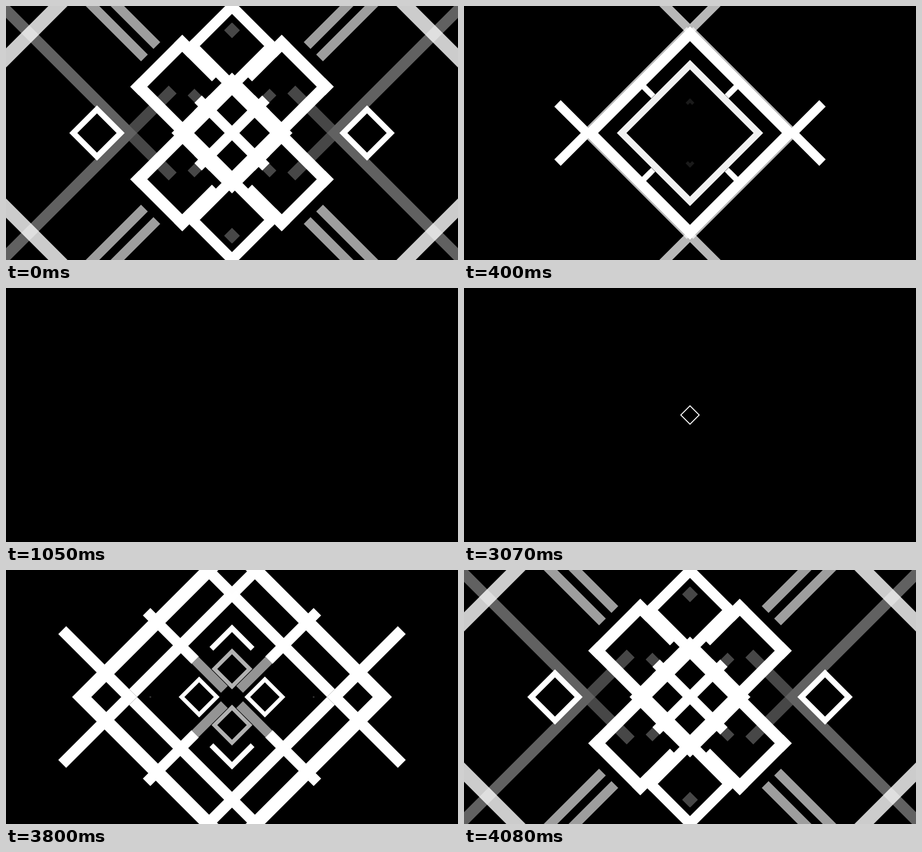
Animation, 800 px wide and 450 px high, one loop 4120 ms. Source, as an HTML page with a canvas:

```html
<!DOCTYPE html>
<html lang="en">
<head>
<meta charset="utf-8">
<title>Diamond lattice</title>
<style>
  html, body { margin: 0; width: 100%; height: 100%; overflow: hidden; background: #000; }
  canvas { display: block; width: 800px; height: 450px; }
</style>
</head>
<body>
<canvas id="stage" width="800" height="450"></canvas>
<script>
const ctx = document.getElementById('stage').getContext('2d');
const LOOP = 4120, EMPTY = 25;
const { min, max, abs, exp, floor, ceil } = Math;
const MIRRORS = [[1, 1], [-1, 1], [1, -1], [-1, -1]];

// Steps away from the fully opened pattern: 0 is open, EMPTY is black.
// Steps last 40 ms near the open pose and a little longer near the empty one.
function stepAt(t) {
  if (t < 680) return floor(t / 40);
  if (t < 1050) return 17 + floor((t - 680) / 46.25);
  if (t < 3070) return EMPTY;
  if (t < 3560) return 13 + ceil((3560 - t) / 44.6);
  return max(0, ceil((4080 - t) / 40));
}

const white = shade => `rgba(255,255,255,${min(1, shade)})`;

// A slanted rectangle in u = x + y, v = y - x, repeated in all four quadrants.
function bar(u0, u1, v0, v1, shade = 1) {
  if (u1 <= u0 || v1 <= v0 || shade <= 0) return;
  const corners = [[u0, v0], [u1, v0], [u1, v1], [u0, v1]];
  ctx.fillStyle = white(shade);
  ctx.beginPath();
  for (const [mx, my] of MIRRORS) {
    const order = mx * my > 0 ? corners : [...corners].reverse();
    order.forEach(([u, v], i) => {
      ctx[i ? 'lineTo' : 'moveTo'](mx * (u - v) / 2, my * (u + v) / 2);
    });
    ctx.closePath();
  }
  ctx.fill();
}

function diamondPath(x, y, r) {
  ctx.moveTo(x, y - r);
  ctx.lineTo(x + r, y);
  ctx.lineTo(x, y + r);
  ctx.lineTo(x - r, y);
  ctx.closePath();
}

function diamond(x, y, r, color) {
  ctx.fillStyle = color;
  ctx.beginPath();
  diamondPath(x, y, r);
  ctx.fill();
}

function ring(x, y, radius, half, shade = 1) {
  if (radius <= 0 || half <= 0 || shade <= 0) return;
  ctx.fillStyle = white(shade);
  ctx.beginPath();
  diamondPath(x, y, radius + half);
  diamondPath(x, y, max(0, radius - half));
  ctx.fill('evenodd');
}

function longLines(k, closing) {
  const middle = 182, half = min(14, 20.3 - .9 * k);
  const inside = middle - half, outside = middle + half;
  const tip = 44 * k - 727;
  const shade = closing ? min(.72, .28 + .1 * k) : min(.28 + .144 * k, 1.22 - .032 * k);
  bar(inside, outside, tip, -inside, .38 + .13 * k);
  bar(inside, outside, max(tip, -inside), min(middle, 70 * k - 28), shade);
  bar(inside, outside, max(tip, inside), 195 + 170 * k, shade);
}

function bigDiamond(k) {
  const radius = 533 * exp(-.0543 * k ** 1.31);
  ring(0, 0, radius, min(17, radius * .075), .8 + .05 * k);
}

function diagonals(k, closing) {
  const start = max(closing ? 130 : 0, 288 - 22.5 * k);
  const end = 568 - 38 * k;
  const offset = max(0, 22 - 2.4 * k), half = max(7, 12 - .6 * k);
  const shade = .62 + .1 * k;
  if (offset > half) {
    bar(start, end, offset - half, offset + half, shade);
    bar(start, end, -offset - half, half - offset, shade);
  } else {
    bar(start, end, -offset - half, offset + half, shade);
  }
  bar(max(start, end - 50), end, -offset - half, offset + half);
  bar(max(0, 118 - 13 * k), min(start, 145 - 2 * k), -12, 12, .28 + (closing ? -.07 : .043) * k);
}

function chevrons(k, closing) {
  const u = 224 - 9.8 * k - .685 * k * k, half = 13 - .9 * k;
  if (u > 0) bar(u - half, u + half, min(56 - k, u), u + half, closing ? 1 - .09 * k : 1);
}

function cornerFrames(k) {
  const q = 1 - k / 4;
  if (q <= 0) return;
  const far = 107 + 155 * q, thick = 30 * q;
  bar(far - thick, far, -68 - thick, 56 + thick);
  bar(100, far, -68 - thick, -68);
  bar(127, far, 56, 56 + thick);
  bar(97, far - 25, 70, 56 + 41 * q);
}

function core(k, closing) {
  if (closing && k > 5) {
    ring(0, 0, 121, min(8.5, 1.25 * (24 - k)), 1.055 - .011 * k);
    bar(23 * (k - 5), 115, -18, 18);
    return;
  }
  const outer = closing ? 67 - .8 * k : 67 - 4.4 * k;
  if (outer <= 0) return;
  const hole = closing ? 27 + 4.2 * k : min(27, outer * .72);
  const sideX = 40 + (closing ? 5.2 : 2.6) * k;
  const topY = 40 + (closing ? 5.2 : 1.4) * k;
  const squares = (r, sideColor, topColor) => {
    for (const s of [-1, 1]) {
      diamond(0, s * topY, r, topColor);
      diamond(s * sideX, 0, r, sideColor);
    }
  };
  const cross = 13 + k;
  squares(outer, white(1), white(closing ? 1 : 1 - .043 * k));
  if (closing || !k) bar(0, 120, -cross, cross);
  squares(hole, '#000', '#000');
  if (closing) bar(cross, 110, -cross - 11, -cross, .08 * k);
}

function sideSquares(k, closing) {
  const r = 49 * (1 - k / (closing ? 4 : 7.2));
  for (const s of [-1, 1]) ring(s * (239 - 13.5 * k), 0, r * .855, r * .145);
}

function draw(t) {
  const k = stepAt(t), closing = k > 0 && t < LOOP / 2;
  ctx.setTransform(1, 0, 0, 1, 0, 0);
  ctx.fillStyle = '#000';
  ctx.fillRect(0, 0, 800, 450);
  if (k >= EMPTY) return;
  ctx.translate(400, 225);
  for (const part of [longLines, diagonals, bigDiamond, chevrons, cornerFrames, core, sideSquares]) {
    part(k, closing);
  }
}

const began = performance.now();
function tick() {
  draw((performance.now() - began) % LOOP);
  requestAnimationFrame(tick);
}
tick();
</script>
</body>
</html>
```
